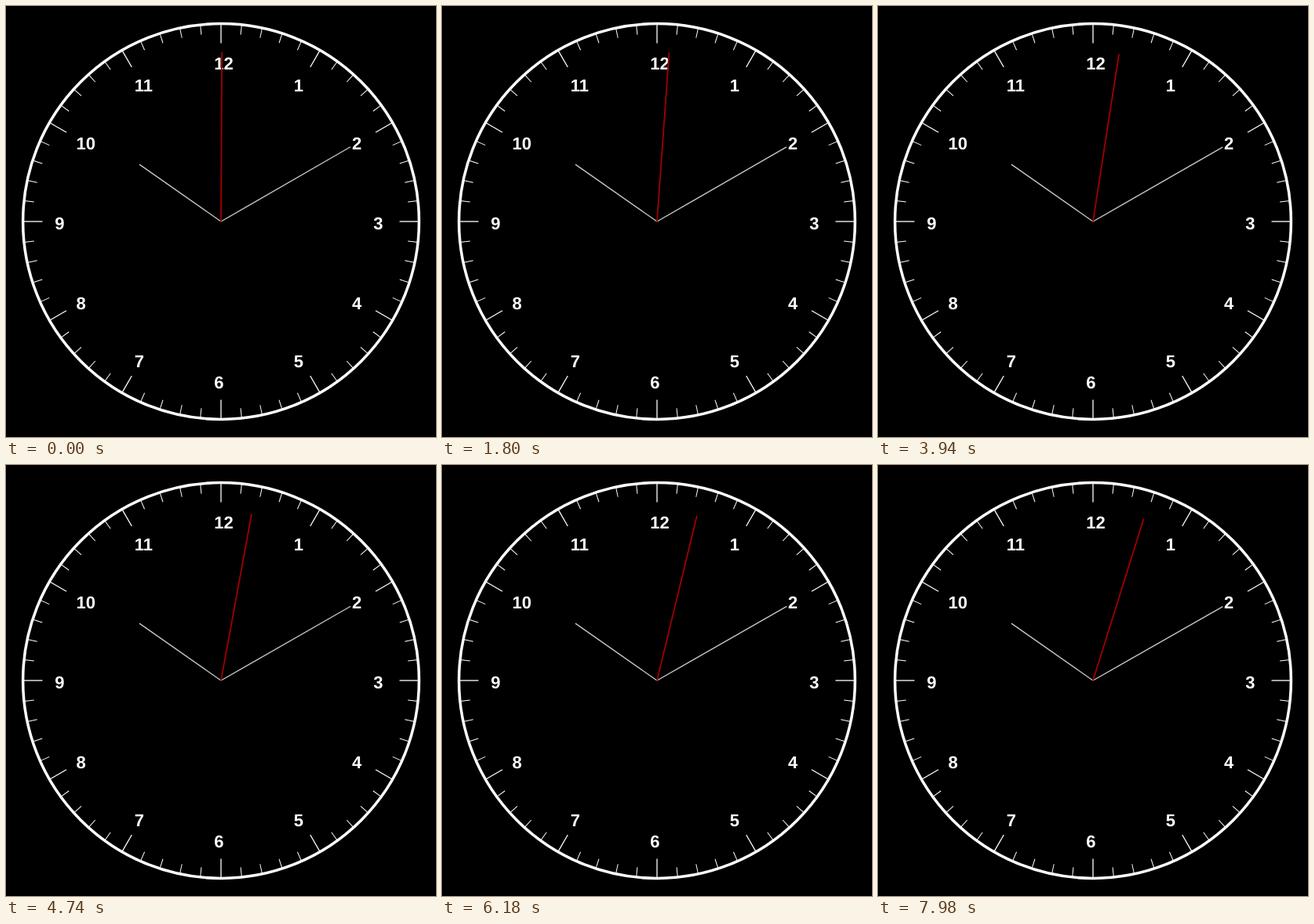
These frames come from a looping animation (548 by 550 pixels, 8000 ms). An HTML page:

```html
<!DOCTYPE html>
<html lang="en">
<head>
<meta charset="utf-8">
<title>Clock</title>
<style>
  html, body { margin: 0; width: 100%; height: 100%; overflow: hidden; background: #000; }
  svg { display: block; }
  line { stroke: #fff; stroke-width: 1; }
  circle { fill: none; stroke: #fff; stroke-width: 3.5; }
  text {
    fill: #fff;
    font: bold 22px "Liberation Sans", Arial, sans-serif;
    font-kerning: normal;
    text-rendering: geometricPrecision;
  }
  .major { stroke-width: 1.3; }
  #hour, #minute { stroke: #c8c8c0; stroke-width: 1.4; }
  #second { stroke: #a00000; stroke-width: 1.8; }
</style>
</head>
<body>
<svg width="548" height="550" viewBox="0 0 548 550">
  <g id="dial"></g>
  <g id="hands"></g>
</svg>
<script>
  const CX = 274, CY = 275, RADIUS = 252.4;
  const LOOP = 8000;
  const START_ANGLE = 0.3, STEP_ANGLE = 0.1;
  const dial = document.getElementById('dial');
  const hands = document.getElementById('hands');

  function add(parent, tag, attrs, label = '') {
    const el = document.createElementNS('http://www.w3.org/2000/svg', tag);
    for (const key in attrs) el.setAttribute(key, attrs[key]);
    el.textContent = label;
    parent.append(el);
    return el;
  }

  const turn = angle => `rotate(${angle} ${CX} ${CY})`;

  // A line along the radius, pointing at 12 until it is turned.
  const spoke = (parent, inner, outer, attrs) =>
    add(parent, 'line', { x1: CX, x2: CX, y1: CY - inner, y2: CY - outer, ...attrs });

  for (let i = 0; i < 60; i++) {
    const major = i % 5 === 0;
    spoke(dial, major ? 227.5 : 239.5, RADIUS, {
      class: major ? 'major' : 'minor',
      transform: turn(i * 6)
    });
  }
  add(dial, 'circle', { cx: CX, cy: CY, r: RADIUS });

  // Numerals are aligned by their left edge and baseline.
  for (let n = 1; n <= 12; n++) {
    const a = n * Math.PI / 6;
    add(dial, 'text', { x: 265.2 + 203 * Math.sin(a), y: 284.8 - 203.5 * Math.cos(a) }, n);
  }

  const hour = spoke(hands, 0, 127, { id: 'hour' });
  const minute = spoke(hands, 0, 190.5, { id: 'minute' });
  const second = spoke(hands, 0, 216.3, { id: 'second' });

  // Three steps every 140 ms, held for 20, 100 and 20 ms.
  function stepAt(time) {
    const phase = time % 140;
    return 3 * Math.floor(time / 140) + (phase >= 20) + (phase >= 120);
  }

  function draw(now) {
    const angle = START_ANGLE + STEP_ANGLE * stepAt(now % LOOP);
    second.setAttribute('transform', turn(angle));
    minute.setAttribute('transform', turn(60 + angle / 60));
    hour.setAttribute('transform', turn(305 + angle / 720));
  }

  const begin = performance.now();
  function tick(now) {
    draw(Math.max(0, now - begin));
    requestAnimationFrame(tick);
  }
  draw(0);
  requestAnimationFrame(tick);
</script>
</body>
</html>
```
